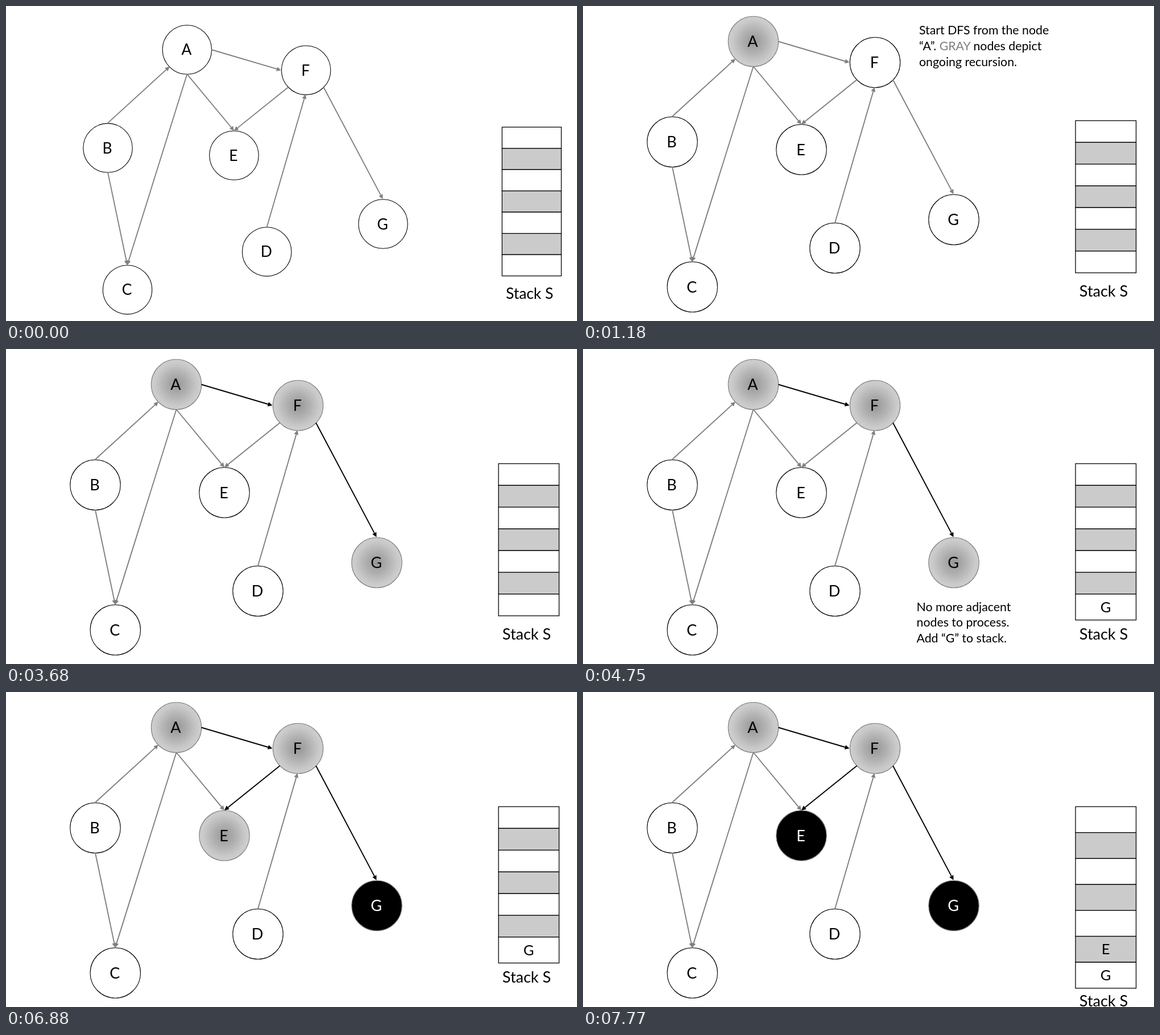
Animation, 1004 px wide and 555 px high, one loop 8000 ms. Source, as an HTML page:

```html
<!DOCTYPE html>
<html lang="en">
<head>
<meta charset="utf-8">
<title>Depth-first search with a stack</title>
<style>
  html, body { margin: 0; width: 100%; height: 100%; overflow: hidden; background: #fff; }
  svg { display: block; width: 1004px; height: 555px; }
  text { font-family: Lato, Carlito, Calibri, sans-serif; font-size: 27px; }
  .mid { text-anchor: middle; }
  .note { font-size: 21.3px; }
  .cell { font-size: 25.5px; }
</style>
</head>
<body>
<svg viewBox="0 0 1004 555">
  <defs>
    <radialGradient id="ongoing">
      <stop offset="0" stop-color="#969696"/>
      <stop offset=".45" stop-color="#b0b0b0"/>
      <stop offset=".85" stop-color="#cacaca"/>
      <stop offset="1" stop-color="#cecece"/>
    </radialGradient>
  </defs>
  <g id="scene"></g>
</svg>
<script>
const LOOP = 8000;
const STARTS = [0, 1180, 2660, 3680, 4750, 5730, 6880, 7770];
const GRAY = '#7f7f7f';
const RADIUS = 44.2;

// gray / black: the step at which a node is entered / finished
const nodes = [
  { name: 'A', x: 299.5, y: 62.5, gray: 1 },
  { name: 'B', x: 157, y: 239.5 },
  { name: 'C', x: 192.3, y: 495 },
  { name: 'D', x: 443, y: 426.5 },
  { name: 'E', x: 384, y: 253, gray: 6, black: 7 },
  { name: 'F', x: 513.5, y: 99.5, gray: 2 },
  { name: 'G', x: 652, y: 376.5, gray: 3, black: 5 },
];

// x1, y1, x2, y2, step at which the edge is followed
const edges = [
  [157, 194.5, 268, 93],
  [157, 283.5, 192, 450.5],
  [299.5, 106.5, 192, 450.5],
  [299.5, 106.5, 384, 208.5],
  [443, 382, 512.5, 143],
  [343.5, 62.5, 468.5, 99.5, 2],
  [545, 130, 651.5, 331.5, 3],
  [481.5, 130, 384, 208.5, 6],
];

const notes = {
  1: { x: 591, y: 50, lines: ['Start DFS from the node',
    `“A”. <tspan fill="${GRAY}">GRAY</tspan> nodes depict`, 'ongoing recursion.'] },
  4: { x: 586.5, y: 461.5, lines: ['No more adjacent', 'nodes to process.', 'Add “G” to stack.'] },
  5: { x: 586.5, y: 461.5, lines: ['Recursion ends for', '“G”. Mark the node', 'as BLACK.'] },
};

const label = (x, y, body, cls, fill = '#000') =>
  `<text x="${x}" y="${y}" class="${cls}" fill="${fill}">${body}</text>`;

function drawEdge([x1, y1, x2, y2, since], step) {
  const color = step >= since ? '#000' : GRAY;
  const len = Math.hypot(x2 - x1, y2 - y1);
  const ux = (x2 - x1) / len, uy = (y2 - y1) / len;
  const bx = x2 - ux * 8, by = y2 - uy * 8;
  return `<path d="M${x1} ${y1}L${bx} ${by}" stroke="${color}" stroke-width="1.9"/>` +
    `<path d="M${x2} ${y2}L${bx - uy * 4} ${by + ux * 4}L${bx + uy * 4} ${by - ux * 4}Z" fill="${color}"/>`;
}

function drawNode({ name, x, y, gray, black }, step) {
  const done = step >= black, open = step >= gray;
  const fill = done ? '#000' : open ? 'url(#ongoing)' : '#fff';
  return `<circle cx="${x}" cy="${y}" r="${RADIUS}" fill="${fill}" stroke="${open ? GRAY : '#000'}" stroke-width="1.1"/>` +
    label(x - 1, y + 9.7, name, 'mid', done ? '#fff' : '#000');
}

function drawStack(step) {
  const items = step >= 7 ? ['G', 'E'] : step >= 4 ? ['G'] : [];
  const tall = 45.7, low = 38.3;
  let y = 202, out = '';
  for (let row = 6; row >= 0; row--) {
    const h = step >= 7 || items[row] ? tall : low;
    out += `<rect x="866" y="${y}" width="106.5" height="${h}" fill="${row % 2 ? '#cbcbcb' : '#fff'}" stroke="#000" stroke-width="1.3"/>`;
    if (items[row]) out += label(919, y + h / 2 + 9, items[row], 'mid cell');
    y += h;
  }
  return out + label(915.5, step >= 7 ? 553.5 : 511.5, 'Stack S', 'mid');
}

function drawNote(step) {
  const note = notes[step];
  return note ? note.lines.map((line, i) => label(note.x, note.y + i * 27.8, line, 'note')).join('') : '';
}

const scene = document.getElementById('scene');
let shown = -1;

function render(now) {
  const t = now % LOOP;
  const step = STARTS.filter(s => s <= t).length - 1;
  if (step !== shown) {
    shown = step;
    // the opening view is slightly zoomed out
    scene.setAttribute('transform', step ? '' : 'translate(25.5 15.9) scale(.9778)');
    scene.innerHTML = nodes.map(n => drawNode(n, step)).join('') +
      edges.map(e => drawEdge(e, step)).join('') + drawStack(step) + drawNote(step);
  }
}

const begin = performance.now();
function tick() {
  render(performance.now() - begin);
  requestAnimationFrame(tick);
}
tick();
</script>
</body>
</html>
```
